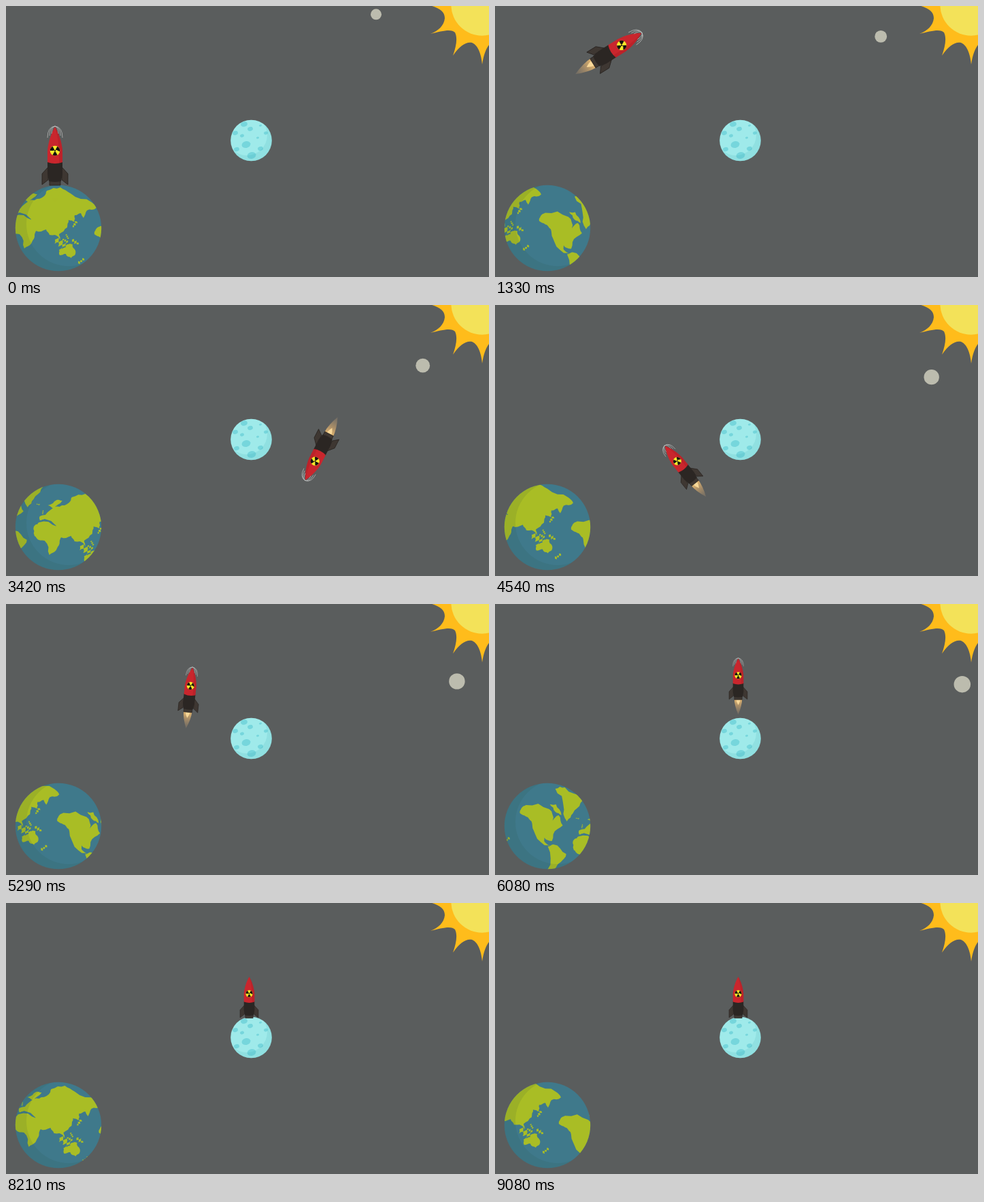
Animation, 710 px wide and 399 px high, one loop 9120 ms. Source, as an HTML page:

```html
<!DOCTYPE html>
<html lang="en">
<head>
<meta charset="utf-8">
<title>Rocket to the moon</title>
<style>
html, body { margin: 0; height: 100%; overflow: hidden; background: #5a5d5d; }
svg { display: block; width: 710px; height: 399px; }
</style>
</head>
<body>
<svg viewBox="0 0 710 399">
  <defs>
    <clipPath id="globe"><circle cx="77" cy="327" r="63.2"/></clipPath>
    <clipPath id="disc"><circle cx="360.5" cy="198" r="30.3"/></clipPath>
    <linearGradient id="fire" x1="0" y1="0" x2="0" y2="1">
      <stop offset="0" stop-color="#e5b871"/>
      <stop offset=".45" stop-color="#b8976a" stop-opacity=".8"/>
      <stop offset="1" stop-color="#a08a70" stop-opacity=".3"/>
    </linearGradient>
    <path id="land" fill="#a9bd25"/>
  </defs>

  <path fill="#ffbc1b" d="M623,-1C637,3 645,8 645,18C644,29 635,37 624,41C640,37 655,33 660,39C664,47 662,59 657,73C667,58 677,52 685,54C695,58 699,74 700,86C702,73 705,63 711,56V-1z"/>
  <circle cx="700" cy="-2" r="45.7" fill="#f3e259"/>
  <circle id="rock" fill="#bcbcae"/>

  <g clip-path="url(#globe)">
    <rect x="10" y="260" width="134" height="134" fill="#3f798b"/>
    <g id="map"><use href="#land"/><use href="#land" id="next"/></g>
    <path fill="#2b4a3a" opacity=".11" fill-rule="evenodd" d="M0,250H160V399H0zM30,321a62,62 0 0 1 124,0a62,62 0 0 1 -124,0"/>
  </g>

  <g clip-path="url(#disc)">
    <rect x="330" y="167" width="62" height="62" fill="#9feaea"/>
    <g id="craters" fill="#76d6dc"/>
    <path fill="#2a9aa0" opacity=".13" fill-rule="evenodd" d="M325,160H395V235H325zM324,190a30,30 0 0 1 60,0a30,30 0 0 1 -60,0"/>
  </g>

  <g id="rocket">
    <g id="flame">
      <path fill="url(#fire)" d="M-8,50Q-8,63 0,82Q8,63 8,50z"/>
      <path fill="#f8d899" d="M-4.5,50Q-4,56 0,62Q4,56 4.5,50z"/>
    </g>
    <path fill="#3e3732" stroke="#26211e" stroke-width=".8" d="M-10,24 -19,34V50L-10,43zM10,24 19,34V50L10,43zM-8,44H8V51H-8z"/>
    <path fill="#2b2623" d="M-11,16H11V34L9,45Q0,47 -9,45L-11,34z"/>
    <path fill="#c9262d" d="M0,-35C5,-27 10,-13 11,0V17Q0,21 -11,17V0C-10,-13 -5,-27 0,-35z"/>
    <path fill="#a81d25" opacity=".4" d="M0,-35C5,-27 10,-13 11,0V17L6,18.5V0C5,-13 3,-27 0,-35z"/>
    <circle r="7.3" fill="#f5e92a"/>
    <circle r="4.4" fill="none" stroke="#15120f" stroke-width="5.6" pathLength="6" stroke-dasharray="1" transform="rotate(180)"/>
    <circle r="1.1" fill="#15120f"/>
    <g id="streaks" fill="none" stroke="#e4e6e4" stroke-width=".7" opacity=".75"/>
  </g>
</svg>
<script>
const LOOP = 9120, LANDED = 6750;
const SPEED = 0.0489, TURN = 204, TILT = 0.3;   // globe scroll in px, along a tilted axis
const $ = id => document.getElementById(id);
const move = (x, y) => `translate(${x} ${y})`;
const points = text => text.split(' ').map(p => p.split(',').map(Number));

let seed = 7;
const random = () => (seed = seed * 16807 % 2147483647) / 2147483647;

// Rough outlines; coast() adds the detail
const continents = [
  // Europe and Asia
  '13,300 27,292 42,286 56,280 60,272 80,267 95,276 126,289 133,297 119,301 114,312 110,305 101,308 100,318 92,315 90,326 78,336 80,345 72,337 64,337 59,329 44,331 37,314 20,304 13,306',
  // Scandinavia
  '25,284 38,276 46,277 34,290',
  // Africa
  '6,313 12,309 38,315 42,324 48,326 42,340 37,350 27,357 20,336 8,332 4,325',
  // Australia
  '78,359 90,351 98,351 102,360 101,367 96,371 88,365 79,367',
  // North America
  '130,336 132,329 139,324 173,330 178,347 187,339 193,354 179,367 177,377 166,372 166,378 175,384 166,383 150,361 147,348 139,341',
  // Baffin Island
  '174,323 183,323 191,339 182,334',
  // Greenland
  '182,300 196,298 226,308 219,321 208,336 199,348 194,325',
  // South America
  '171,385 179,382 198,396 190,408 177,425 170,420'
];

// Island chains: from x,y to x,y
const chains = ['104,317 98,326', '88,336 92,343', '72,344 88,355', '83,343 91,348',
                '97,344 107,351', '115,372 106,379', '18,291 17,297', '8,282 13,283'];

// Split each edge twice, pushing the middle sideways at random
function coast(shape, depth = 2) {
  if (!depth) return shape;
  return coast(shape.flatMap(([x, y], i) => {
    const [u, v] = shape[(i + 1) % shape.length], k = (random() - 0.5) * 0.3;
    return [[x, y], [(x + u) / 2 + (v - y) * k, (y + v) / 2 - (u - x) * k]];
  }), depth - 1);
}

function islands([[x, y], [u, v]]) {
  const dx = (u - x) / 3, dy = (v - y) / 3;
  return [0, 1, 2].map(i => {
    const size = 0.4 + random() * 0.5;
    return coast([[x + dx * i, y + dy * i], [x + dx * (i + 0.5) - dy * size, y + dy * (i + 0.5) + dx * size],
                  [x + dx * (i + 1), y + dy * (i + 1)], [x + dx * (i + 0.5) + dy * size, y + dy * (i + 0.5) - dx * size]], 1);
  });
}

const shapes = [...continents.map(c => coast(points(c))), ...chains.flatMap(c => islands(points(c)))];
$('land').setAttribute('d', shapes.map(s => `M${s.join(' ')}z`).join(''));
$('next').setAttribute('transform', move(TURN, TURN * TILT));

// x, y, radius
$('craters').innerHTML = points('350,174,5 359,181,4 374,176,2 382,187,3 337,187,4 347,191,3 370,194,2 353,204,6.5 374,210,4 339,211,4 361,220,6.5')
  .map(([x, y, r]) => `<ellipse rx="${r}" ry="${r * 0.75}" transform="${move(x, y)} rotate(-15)"/>`).join('');

$('streaks').innerHTML = [-11, -8, -5, 5, 8, 11]
  .map(x => `<path d="M0,-36Q${x},-35 ${x},${-30 + Math.abs(x)}"/>`).join('');

// time, x, y, heading
const flight = points('0,72,213,0 700,86,135,14 1330,186,58,58 2380,378,57,109.4 3190,470,190,182 3910,375,293,263 4540,268,230,321 5250,268,125,365 5750,345,90,362 6080,357.5,105,360')
  .concat([[LANDED, 357.5, 133.5, 360]]);

// rate of change at a key; at rest at both ends
function slope(i, k) {
  const a = flight[i - 1], b = flight[i + 1];
  return a && b ? (b[k] - a[k]) / (b[0] - a[0]) : 0;
}

function pose(t) {
  t = Math.min(t, LANDED);
  const i = Math.max(1, flight.findIndex(key => key[0] >= t));
  const a = flight[i - 1], b = flight[i], span = b[0] - a[0];
  const u = (t - a[0]) / span, w = 1 - u;
  return [1, 2, 3].map(k =>
    w * w * (1 + 2 * u) * a[k] + u * u * (3 - 2 * u) * b[k] +
    span * u * w * (w * slope(i - 1, k) - u * slope(i, k)));
}

function draw() {
  const t = performance.now() % LOOP, s = t / 1000;

  const shift = t * SPEED % TURN;
  $('map').setAttribute('transform', move(-shift, -shift * TILT));

  $('rock').setAttribute('cx', 544 + 15.7 * s + 1.28 * s * s);
  $('rock').setAttribute('cy', 12.3 + s * (24.8 - 0.2 * s * s));
  $('rock').setAttribute('r', 8 + 0.7 * s);

  const [x, y, heading] = pose(t);
  const scale = 1 - 0.295 * Math.min(1, s / 6.08) ** 1.7;
  $('rocket').setAttribute('transform', `${move(x, y)} rotate(${heading}) scale(${scale})`);
  const flying = t < LANDED + 40;
  $('flame').setAttribute('opacity', flying ? Math.min(1, t / 250) : 0);
  $('streaks').setAttribute('visibility', flying ? 'visible' : 'hidden');

  requestAnimationFrame(draw);
}
draw();
</script>
</body>
</html>
```
